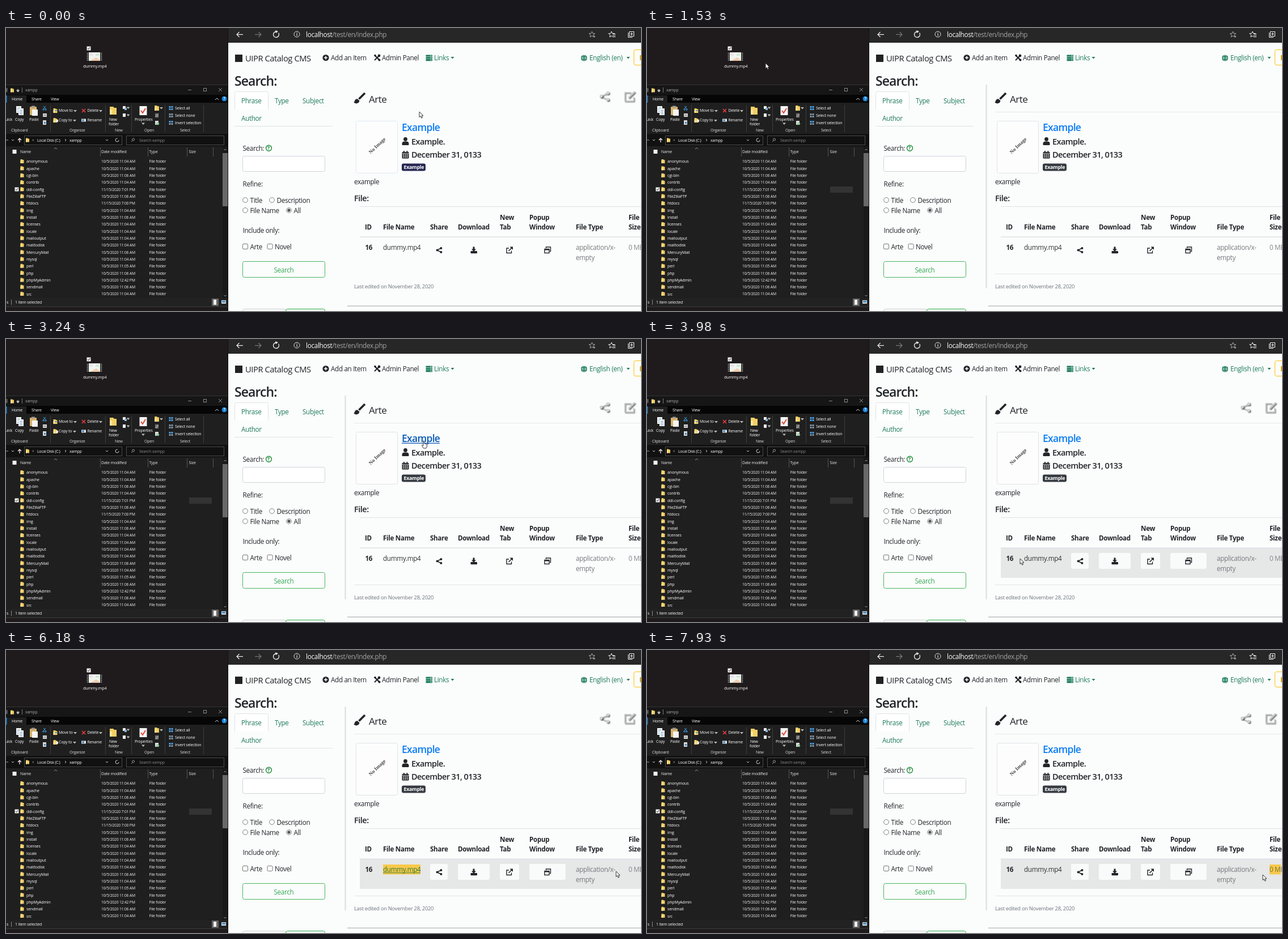
Write an HTML page with a canvas that moves like this. It is 1120x500 px and loops after 8 s.

```html
<!DOCTYPE html>
<html lang="en">
<head>
<meta charset="utf-8">
<title>Catalog page and file explorer</title>
<style>
html, body { margin: 0; width: 100%; height: 100%; overflow: hidden; background: #fbfcfc; }
canvas { display: block; width: 1120px; height: 500px; }
</style>
</head>
<body>
<canvas id="stage" width="1120" height="500"></canvas>
<script>
const c = document.getElementById('stage').getContext('2d');
const LOOP = 8000;
const SANS = '"Open Sans", "Noto Sans", sans-serif';
const INK = '#212529', GREEN = '#1d7b5c', LINE = '#dee2e6', YELLOW = '#f8c94b', FOLDER = '#f3cf64';

// Bursts of movement: start, end, number of steps
const bursts = [
  [150, 1140, 8], [1260, 2190, 8], [2340, 3240, 8], [3520, 4520, 8],
  [4670, 5610, 7], [5760, 6690, 8], [6810, 7110, 3], [7540, 7930, 4]
];

// Pointer path: time, x, y
const path = [
  [0, 729, 148], [600, 690, 125], [1140, 604, 72], [1260, 440, 66], [1525, 209, 62],
  [1660, 215, 62], [1930, 400, 70], [2190, 619, 84], [2340, 640, 100], [2800, 715, 158],
  [3105, 736, 178], [3240, 736, 180], [3520, 733, 192], [3660, 705, 268], [3800, 670, 355],
  [3948, 658, 388], [4235, 664, 387], [4520, 678, 387], [4825, 708, 388], [4983, 732, 390],
  [5140, 742, 396], [5296, 766, 401], [5453, 811, 403], [5610, 947, 402], [5760, 990, 399],
  [6158, 1076, 391], [6420, 1097, 386], [6690, 1107, 385], [6810, 1111, 385],
  [7110, 1124, 384], [7539, 1124, 390], [7540, 1116, 396], [7930, 1086, 397]
];

function stepTime(t) {
  let last = 0;
  for (const [a, b, n] of bursts) {
    if (t < a) break;
    const d = (b - a) / (n - 1);
    last = a + Math.min(n - 1, Math.floor((t - a) / d + 1e-6)) * d;
  }
  return last;
}

function pointerAt(t) {
  for (let i = 1; i < path.length; i++) {
    const [t0, x0, y0] = path[i - 1], [t1, x1, y1] = path[i];
    if (t <= t1) {
      const k = (t - t0) / (t1 - t0);
      return [x0 + (x1 - x0) * k, y0 + (y1 - y0) * k];
    }
  }
  return path[path.length - 1].slice(1);
}

// y is the middle of the capitals
function text(s, x, y, size = 11.7, color = INK, weight = 400, track = -0.028) {
  c.font = `${weight} ${size}px ${SANS}`;
  c.letterSpacing = track * size + 'px';
  c.fillStyle = color;
  c.fillText(s, x, y + size * 0.35);
}
function box(x, y, w, h, color) {
  c.fillStyle = color;
  c.fillRect(x, y, w, h);
}
function round(x, y, w, h, r, fill, stroke) {
  c.beginPath();
  c.roundRect(x, y, w, h, r);
  if (fill) { c.fillStyle = fill; c.fill(); }
  if (stroke) { c.strokeStyle = stroke; c.lineWidth = 1; c.stroke(); }
}
function disc(x, y, r, color) {
  c.beginPath();
  c.arc(x, y, r, 0, 7);
  c.fillStyle = color;
  c.fill();
}
function ring(x, y, r, color, w = 1) {
  c.beginPath();
  c.arc(x, y, r, 0, 7);
  c.strokeStyle = color;
  c.lineWidth = w;
  c.stroke();
}
// Polyline from a flat list of coordinates
function trace(p) {
  c.beginPath();
  for (let i = 0; i < p.length; i += 2) c.lineTo(p[i], p[i + 1]);
}
function line(p, color, w = 1) {
  trace(p);
  c.strokeStyle = color;
  c.lineWidth = w;
  c.stroke();
}
function poly(p, color) {
  trace(p);
  c.fillStyle = color;
  c.fill();
}
function at(x, y, scale, draw) {
  c.save();
  c.translate(x, y);
  c.scale(scale, scale);
  draw();
  c.restore();
}
const caret = (x, y, color) => poly([x - 3, y - 1.5, x + 3, y - 1.5, x, y + 2], color);

function folder(x, y, k = 1) {
  at(x, y, k, () => {
    poly([-3, -3.5, 0, -3.5, 1, -2.5, 3, -2.5, 3, 3.5, -3, 3.5], FOLDER);
    box(-3, -1, 2, 4.5, '#fbe6a0');
  });
}
function tick(x, y, on) {
  box(x - 3.5, y - 3.5, 7, 7, '#f2f2f2');
  if (on) line([x - 2, y, x - 0.5, y + 1.7, x + 2.2, y - 2], '#222', 1);
}
function shareIcon(x, y, k, color, w = 1.6, r = 2.1) {
  at(x, y, k, () => {
    line([4, -4, -4, 0, 4, 4], color, w);
    disc(3.6, -3.6, r, color);
    disc(-3.6, 0, r, color);
    disc(3.6, 3.6, r, color);
  });
}
function star(x, y, r, color) {
  const p = [];
  for (let i = 0; i <= 10; i++) {
    const a = i * Math.PI / 5 - Math.PI / 2, q = i % 2 ? r * 0.45 : r;
    p.push(x + q * Math.cos(a), y + q * Math.sin(a));
  }
  line(p, color, 1);
}

const files = 'anonymous apache cgi-bin contrib ddl-config FileZillaFTP htdocs img install licenses locale mailoutput mailtodisk MercuryMail mysql perl php phpMyAdmin sendmail src'.split(' ');
const stamps = {
  'ddl-config': '11/15/2020 7:01 PM', htdocs: '11/15/2020 7:00 PM',
  phpMyAdmin: '10/5/2020 12:42 PM', perl: '10/5/2020 11:05 AM'
};
const lateFiles = ['cgi-bin', 'FileZillaFTP', 'install', 'MercuryMail', 'php', 'sendmail'];

function drawDesktop() {
  box(0, 0, 392, 500, '#1f1b1c');
  tick(146, 36, true);
  box(142, 43, 28, 15, '#2c2c2c');
  for (let i = 0; i < 5; i++) {
    box(143, 44 + i * 3, 1.5, 1.5, '#aaa');
    box(167.5, 44 + i * 3, 1.5, 1.5, '#aaa');
  }
  box(146, 43, 20, 15, '#f1f4ee');
  box(147, 44, 6, 5, '#ece0f0');
  poly([150, 57, 159, 52, 165, 56, 165, 58, 150, 58], '#f0cdb0');
  box(158, 45, 6, 4, '#cfe8d8');
  text('dummy.mp4', 136, 67, 7.3, '#fff');
}

function drawRibbon() {
  const s = (str, x, y, color = '#fff') => text(str, x, y, 6.9, color, 400, -0.025);
  box(0, 100, 391, 18, '#161616');
  box(0, 118, 391, 14, '#060606');
  box(0, 119, 36, 13, '#1f1f1f');
  box(0, 119, 1.5, 13, '#1683d8');
  box(0, 132, 391, 55, '#1f1f1f');
  line([0, 100.5, 391, 100.5], '#353535');
  line([1.5, 106, 1.5, 113], '#aaa');
  folder(11, 110);
  line([19, 109, 23, 109], '#ccc');
  caret(21, 111.5, '#ccc');
  line([28.5, 105, 28.5, 114], '#777');
  s('xampp', 34, 109.5, '#aaa');
  line([321, 109.5, 327, 109.5], '#888');
  c.strokeRect(348.5, 106.5, 5, 5);
  line([375, 106, 381, 112], '#888');
  line([381, 106, 375, 112], '#888');
  text('Home', 10, 125.5, 7, '#fff');
  text('Share', 45, 125.5, 7, '#fff');
  text('View', 79, 125.5, 7, '#fff');
  line([369, 127, 372, 124, 375, 127], '#ccc');
  disc(385, 125, 4.5, '#1683d8');
  text('?', 383.4, 125, 7, '#fff', 700);

  // Clipboard
  for (const [x, y] of [[18, 138], [22, 142]]) {
    box(x, y, 9, 12, '#f4f4f4');
    for (let i = 0; i < 3; i++) box(x + 2, y + 3 + i * 3, 5, 1, '#6d9cc7');
  }
  round(42, 139, 12, 15, 1, '#d8b36a');
  box(45, 137.5, 6, 3, '#999');
  box(46, 144, 10, 11, '#f5f5f5');
  line([66, 138, 70, 143], '#3d9be0');
  line([70, 138, 66, 143], '#3d9be0');
  ring(66, 144, 1.2, '#3d9be0');
  ring(70, 144, 1.2, '#3d9be0');
  box(65, 151, 7, 6, '#d9d9d9');
  line([66, 154, 71, 154], '#555');
  box(65, 163, 6, 8, '#d9d9d9');
  box(67, 166, 3, 3, '#3f85c4');
  s('uick', -1, 161.5);
  s('Copy', 16, 161.5);
  s('Paste', 41, 161.5);

  // Organize
  folder(87, 146, 1.15);
  line([86, 146, 90, 146], '#2e8ad0', 1.4);
  folder(87, 163, 1.15);
  box(88, 162, 4, 4, '#e8e8e8');
  s('Move to', 93, 146);
  caret(122, 146.5, '#bbb');
  s('Copy to', 93, 163);
  caret(121, 163.5, '#bbb');
  line([134, 143, 140, 149], '#e8383b', 1.7);
  line([140, 143, 134, 149], '#e8383b', 1.7);
  s('Delete', 143.5, 146);
  caret(167, 146.5, '#bbb');
  box(133, 160.5, 8, 5, '#e5e5e5');
  box(134, 161.5, 4, 3, '#3b8acb');
  s('Rename', 143.5, 163);

  // New and Open
  folder(189, 146, 2);
  box(206, 138, 5, 5, '#eee');
  box(209, 141, 4, 4, '#8db4d4');
  caret(215.5, 141, '#bbb');
  box(206, 151, 5, 6, '#eee');
  caret(215.5, 154, '#bbb');
  s('New', 182, 161.5);
  s('folder', 181, 169.5);
  box(235.5, 138, 13, 16, '#f6f6f6');
  line([238, 146, 241, 150, 246, 142], '#e24c3a', 2);
  s('Properties', 227, 161.5);
  caret(242, 169, '#bbb');
  folder(266, 141.5, 1.3);
  caret(274, 141.5, '#bbb');
  box(263, 151, 6, 7, '#777');
  line([264, 157, 269, 152], '#bbb');
  box(263, 164, 6, 7, '#ddd');
  ring(268, 169, 2, '#4db06a');

  // Select
  [['Select all', 4], ['Select none', 0], ['Invert selection', 2]].forEach(([label, full], i) => {
    for (let k = 0; k < 4; k++) {
      box(287.5 + (k % 2) * 4, 138 + i * 13 + (k >> 1) * 4, 3, 3, k < full ? '#4ba0e6' : '#8097a8');
    }
    s(label, 298, 141.5 + i * 13);
  });
  [['Clipboard', 9], ['Organize', 112], ['New', 192], ['Open', 244], ['Select', 307]]
    .forEach(([label, x]) => s(label, x, 181, '#ddd'));
  for (const x of [78.5, 175.5, 221.5, 280.5, 348.5]) line([x, 136, x, 184], '#3d3d3d');
}

function drawExplorer(marked) {
  drawRibbon();
  const s = (str, x, y, color = '#fff') => text(str, x, y, 7, color, 400, -0.02);

  box(0, 187, 391, 22, '#111');
  c.lineWidth = 1;
  c.strokeStyle = '#4b4b4b';
  c.strokeRect(32.5, 190.5, 172, 16);
  c.strokeRect(212.5, 190.5, 172, 16);
  line([10, 197, 12, 199, 14, 197], '#ccc');
  line([0, 198, 4, 198], '#999');
  line([24, 202, 24, 195], '#fff', 1.2);
  line([21, 198, 24, 195, 27, 198], '#fff', 1.2);
  folder(38, 198);
  s('«', 46, 198, '#aaa');
  text('Local Disk (C:)', 55, 198.5, 6.8, '#fff', 500);
  line([104, 196, 106, 198, 104, 200], '#ccc');
  text('xampp', 112, 198.5, 7, '#fff', 500);
  line([176, 197, 178, 199, 180, 197], '#ccc');
  c.beginPath();
  c.arc(196, 198, 3, 0, 5);
  c.strokeStyle = '#ccc';
  c.stroke();
  ring(224.5, 197, 2, '#999');
  line([223, 199, 221, 201], '#999');
  s('Search xampp', 235, 198.5, '#8c8c8c');

  box(0, 209, 391, 268, '#1f1f1f');
  box(11.5, 215, 7, 7, '#f2f2f2');
  line([85, 214, 87.5, 211.5, 90, 214], '#999');
  [['Name', 25], ['Date modified', 168], ['Type', 252.5], ['Size', 322.5]]
    .forEach(([label, x]) => s(label, x, 218.5, '#eee'));
  for (const x of [166.5, 250.5, 319.5, 365.5]) line([x, 211, x, 227], '#555');

  if (marked) box(323, 280, 40, 11, '#333');
  files.forEach((name, i) => {
    const y = 236 + i * 12.32;
    folder(28.5, y - 0.5);
    s(name, 36, y);
    const stamp = stamps[name] || `10/5/2020 11:${lateFiles.includes(name) ? '06' : '04'} AM`;
    text(stamp, 168, y, 6.8, '#f0f0f0', 400, -0.03);
    text('File folder', 252.5, y, 6.9, '#f0f0f0', 400, -0.025);
  });
  tick(19, 285, true);

  box(382, 209, 9, 268, '#191919');
  box(382, 221, 9.5, 94, '#686868');
  line([384.5, 216, 386.5, 214, 388.5, 216], '#aaa');
  line([384.5, 472, 386.5, 474, 388.5, 472], '#aaa');
  box(0, 477, 391, 15, '#222');
  s('s', 1, 484.5);
  line([9.5, 480, 9.5, 489], '#888');
  s('1 item selected', 16, 484.5);
  box(363, 478, 12, 13, '#666');
  box(366, 480, 5, 9, '#eee');
  box(380, 481, 8, 6, '#ddd');
  box(381, 482, 6, 3, '#3d8fd1');
  line([0, 492.5, 391, 492.5], '#3c3c3c');
  box(391, 0, 1, 500, '#111');
}

function drawBrowserBar() {
  box(392, 0, 728, 26, '#272727');
  line([418, 11.5, 407, 11.5], '#eee', 1.2);
  line([411.5, 7, 407, 11.5, 411.5, 16], '#eee', 1.2);
  line([439, 11.5, 450, 11.5], '#777', 1.2);
  line([445.5, 7, 450, 11.5, 445.5, 16], '#777', 1.2);
  c.beginPath();
  c.arc(476.5, 11.5, 5, -0.6, 5);
  c.strokeStyle = '#eee';
  c.lineWidth = 1.3;
  c.stroke();
  poly([475, 4, 480, 6, 476, 9], '#eee');
  ring(513, 11, 5, '#ddd');
  box(512.5, 10, 1.2, 4, '#ddd');
  box(512.5, 8, 1.2, 1.2, '#ddd');
  text('localhost', 529, 11.5, 11.75, '#fff');
  text('/test/en/index.php', 529 + c.measureText('localhost').width, 11.5, 11.75, '#a5a5a5');
  star(1033.5, 11.5, 5.5, '#aaa');
  disc(1037.5, 15, 1.6, '#999');
  star(1068, 11.5, 5.5, '#eee');
  box(1070, 10, 6, 6, '#272727');
  for (let i = 0; i < 3; i++) box(1070, 10 + i * 2.5, 5, 1, '#eee');
  c.strokeStyle = '#eee';
  c.lineWidth = 1;
  c.strokeRect(1099.5, 6.5, 8, 8);
  line([1097.5, 8, 1097.5, 16.5, 1105, 16.5], '#eee');
  line([1103.5, 8, 1103.5, 13], '#eee');
  line([1101, 10.5, 1106, 10.5], '#eee');
}

function drawNav() {
  box(404, 47, 13, 13, '#222');
  text('UIPR Catalog CMS', 422, 53.5, 14.7);
  disc(564, 52.5, 5.6, INK);
  line([561, 52.5, 567, 52.5], '#fff', 1.6);
  line([564, 49.5, 564, 55.5], '#fff', 1.6);
  text('Add an Item', 573, 53);
  line([650, 48, 659, 57], INK, 2.4);
  line([659, 48, 650, 57], INK, 2);
  disc(658, 49, 2.4, INK);
  disc(651, 48.5, 1.8, INK);
  disc(658.5, 56.5, 2, INK);
  text('Admin Panel', 663, 53);
  for (let i = 0; i < 3; i++) {
    round(740.5, 47.5 + i * 3.8, 11.5, 3.1, 0.7, GREEN);
    box(748.5, 48.5 + i * 3.8, 2, 1, '#fff');
  }
  text('Links', 755, 53, 11.7, GREEN);
  caret(787.5, 52.5, GREEN);
  disc(1019.5, 53, 5.5, GREEN);
  line([1014, 53, 1025, 53], '#fff', 0.7);
  c.beginPath();
  c.ellipse(1019.5, 53, 2.4, 5.5, 0, 0, 7);
  c.strokeStyle = '#fff';
  c.stroke();
  text('English (en)', 1029, 53, 11.7, GREEN);
  caret(1097.5, 52.5, GREEN);
  round(1107.5, 38.5, 30, 27, 3, null, '#ffc107');
  box(1118, 48, 2, 9, '#e0a800');
}

function drawSidebar() {
  text('Search:', 403, 94, 23, INK, 600, -0.04);
  line([403, 173.5, 576, 173.5], LINE);
  c.beginPath();
  c.moveTo(403.5, 143.5);
  c.lineTo(403.5, 116);
  c.arcTo(403.5, 112.5, 407, 112.5, 3);
  c.lineTo(459, 112.5);
  c.arcTo(462.5, 112.5, 462.5, 116, 3);
  c.lineTo(462.5, 143.5);
  c.fillStyle = '#fff';
  c.fill();
  c.strokeStyle = LINE;
  c.lineWidth = 1;
  c.stroke();
  text('Phrase', 415, 129, 11.7, GREEN);
  text('Type', 474, 129, 11.7, GREEN);
  text('Subject', 523, 129, 11.7, GREEN);
  text('Author', 415, 159.5, 11.7, GREEN);
  text('Search:', 417.5, 212.5);
  ring(463.5, 212.3, 5, '#1b8a35', 1.4);
  text('?', 461, 212.3, 9, '#1b8a35', 700);
  round(417.5, 226.5, 145, 27, 3, '#fff', '#ced4da');
  text('Refine:', 417.5, 275.5);
  const radio = (x, y, label, on) => {
    ring(x, y, 4.4, '#777', 0.9);
    if (on) disc(x, y, 2.7, '#555');
    text(label, x + 8.5, y + 0.8);
  };
  radio(422, 304, 'Title');
  radio(469, 304, 'Description');
  radio(422, 322, 'File Name');
  radio(499, 322, 'All', true);
  text('Include only:', 417.5, 358);
  const check = (x, label) => {
    round(x - 4.5, 381.5, 9, 9, 1.5, '#fff', '#777');
    text(label, x + 8.5, 387);
  };
  check(422, 'Arte');
  check(465.5, 'Novel');
  round(417.5, 412.5, 145, 28, 3, null, '#46b560');
  text('Search', 472.5, 427.5, 11.7, '#35a853');
  round(417.5, 496.5, 76, 20, 3, null, '#ccc');
  round(493.5, 496.5, 69, 20, 3, null, '#28a745');
}

function drawItem(t, linkHover) {
  const settled = t >= 150;
  if (t >= 1260) box(597.5, 100, 2, 360, '#dcdddd');
  if (settled) {
    line([614, 148.5, 1120, 148.5], '#e6e7e7');
    line([614, 434.5, 1120, 434.5], '#e2e3e3');
  }
  line([633, 115, 622.5, 125.5], INK, 3.8);
  poly([613.5, 132, 616, 126.5, 619.5, 125, 623.5, 128.5, 622, 132, 618, 133.5], INK);
  text('Arte', 640, 126, 17.1, INK, 400, -0.03);

  if (t < 1260 || t >= 2340) {
    c.save();
    c.shadowColor = 'rgba(0,0,0,.6)';
    c.shadowBlur = 2;
    c.shadowOffsetX = c.shadowOffsetY = 1.5;
    shareIcon(1055.5, 120.5, 1.6, '#d0d0d0', 0.9, 1.7);
    line([1102, 114, 1091.5, 114, 1091.5, 129, 1107, 129, 1107, 122], '#c4c4c4', 1.5);
    line([1098, 123.5, 1109, 112.5], '#c4c4c4', 2.6);
    c.restore();
  }

  round(617.5, 164.5, 73, 92, 3, '#fdfdfd', settled ? LINE : '#dcebf3');
  c.save();
  c.translate(655, 208);
  c.rotate(-0.76);
  c.font = 'bold 9px "Liberation Serif", serif';
  c.letterSpacing = '0px';
  c.textAlign = 'center';
  c.fillStyle = '#444';
  c.fillText('No Image', 0, 2.5);
  c.restore();

  const blue = linkHover ? '#0b5bb8' : '#0a7cf5';
  text('Example', 698, 175.5, 17.5, blue, 600, -0.04);
  if (linkHover) box(698, 183.5, 67, 1.3, blue);
  disc(704.5, 196.5, 3.4, INK);
  round(698.5, 200.5, 12, 6.5, [4, 4, 1, 1], INK);
  text('Example.', 715, 200.8, 14.5, INK, 600, -0.04);
  round(698.5, 219, 12, 11.5, 1, INK);
  box(701, 217, 1.8, 3, INK);
  box(706.5, 217, 1.8, 3, INK);
  box(698.5, 221.3, 12, 0.8, '#fff');
  for (let i = 0; i < 6; i++) box(700.3 + (i % 3) * 3.2, 223.5 + (i > 2) * 3.3, 1.9, 1.8, '#fff');
  text('December 31, 0133', 715, 224.3, 14.5, INK, 600, -0.04);
  round(698, 239.5, 42, 13, 3, settled ? '#343a40' : '#252651');
  text('Example', 701.5, 246, 8.8, '#fff', 700);
  text('example', 614, 272);
  text('File:', 614, 301, 14.5, INK, 600, -0.035);
}

// Text with its part left of x = end marked as selected
function selectable(str, x, color, chosen, end, underline) {
  text(str, x, 388, 11.7, color);
  if (end <= x) return;
  c.save();
  c.beginPath();
  c.rect(x, 378, end - x, 19);
  c.clip();
  box(x, 379, 400, 17.5, YELLOW);
  text(str, x, 388, 11.7, chosen);
  if (underline) box(x, 393.3, 66, 0.9, chosen);
  c.restore();
}

function drawTable(t, px, rowHover) {
  line([624, 315.5, 1120, 315.5], LINE);
  const head = (label, x, y) => text(label, x, y, 11.6, INK, 700, -0.025);
  head('ID', 633, 352);
  head('File Name', 665, 352);
  head('Share', 748, 352);
  head('Download', 797, 352);
  head('New', 871, 334.5);
  head('Tab', 871, 352);
  head('Popup', 923, 334.5);
  head('Window', 923, 352);
  head('File Type', 1005, 352);
  head('File', 1098, 334.5);
  head('Size', 1098, 352);
  if (rowHover) box(624, 369, 496, 53, '#e6e7e7');
  line([624, 369.3, 1120, 369.3], LINE, 1.5);
  if (rowHover) {
    for (const [x, w] of [[748, 31], [797, 56], [871, 34], [923, 64]]) round(x, 378, w, 28, 3, '#f9fafa');
  }
  text('16', 633.5, 388, 11.7, INK, 700);

  const nameEnd = t < 4235 || t >= 6420 ? 0 : t >= 4983 ? 731 : Math.min(px, 731);
  selectable('dummy.mp4', 665, '#333', '#2d7a38', nameEnd, true);
  const sizeEnd = t < 6420 ? 0 : t >= 7110 ? 1118 : Math.min(px, 1118);
  selectable('0 MB', 1098, '#85898c', '#7b7434', sizeEnd);
  text('application/x-', 1005, 388, 11.7, '#75797c');
  text('empty', 1005, 405.5, 11.7, '#75797c');

  shareIcon(764, 392.5, 0.95, INK);
  box(823.5, 386.5, 3, 5, INK);
  poly([821, 390.5, 829, 390.5, 825, 395], INK);
  round(819.5, 394, 11.5, 4.2, 1, INK);
  line([887, 389, 883, 389, 883, 397.5, 891.5, 397.5, 891.5, 393.5], INK, 1.4);
  line([886.5, 394, 892, 388.5], INK, 1.6);
  poly([888.5, 386.5, 894, 386.5, 894, 392], INK);
  line([952.5, 389, 952.5, 387, 960.5, 387, 960.5, 394.5, 959, 394.5], INK, 1.4);
  c.strokeStyle = INK;
  c.strokeRect(950, 390.5, 8, 7);
  box(950, 390, 8, 2.5, INK);

  text('Last edited on November 28, 2020', 614, 457, 9.3, '#6c757d');
  box(602, 490.5, 518, 1.5, '#bfc0c1');
}

function drawPointer(x, y, hand) {
  at(x, y, 1, () => {
    c.lineJoin = 'round';
    trace(hand
      ? [0, 0, 1.5, 0, 1.8, 4.5, 6.5, 6, 6.5, 10, 5, 13, 0.5, 13, -2.5, 8.5, -2, 7.3, 0, 8.5]
      : [0, 0, 0, 9.6, 2.2, 7.6, 3.8, 11.2, 5.5, 10.4, 4, 7, 7, 7]);
    c.closePath();
    c.fillStyle = '#fff';
    c.fill();
    c.strokeStyle = '#222';
    c.lineWidth = 0.9;
    c.stroke();
    c.lineJoin = 'miter';
  });
}

function draw(t) {
  const [x, y] = pointerAt(t);
  const linkHover = x > 698 && x < 765 && y > 167 && y < 185;
  const rowHover = t > 3520 && y > 369;
  box(392, 0, 728, 500, '#fbfcfc');
  drawDesktop();
  drawExplorer(t >= 1260);
  drawBrowserBar();
  drawNav();
  drawSidebar();
  drawItem(t, linkHover);
  drawTable(t, x, rowHover);
  drawPointer(x, y, linkHover);
}

const start = performance.now();
let shown = -1;
function frame() {
  const t = stepTime((performance.now() - start) % LOOP);
  if (t !== shown) draw(shown = t);
  requestAnimationFrame(frame);
}
frame();
</script>
</body>
</html>
```
